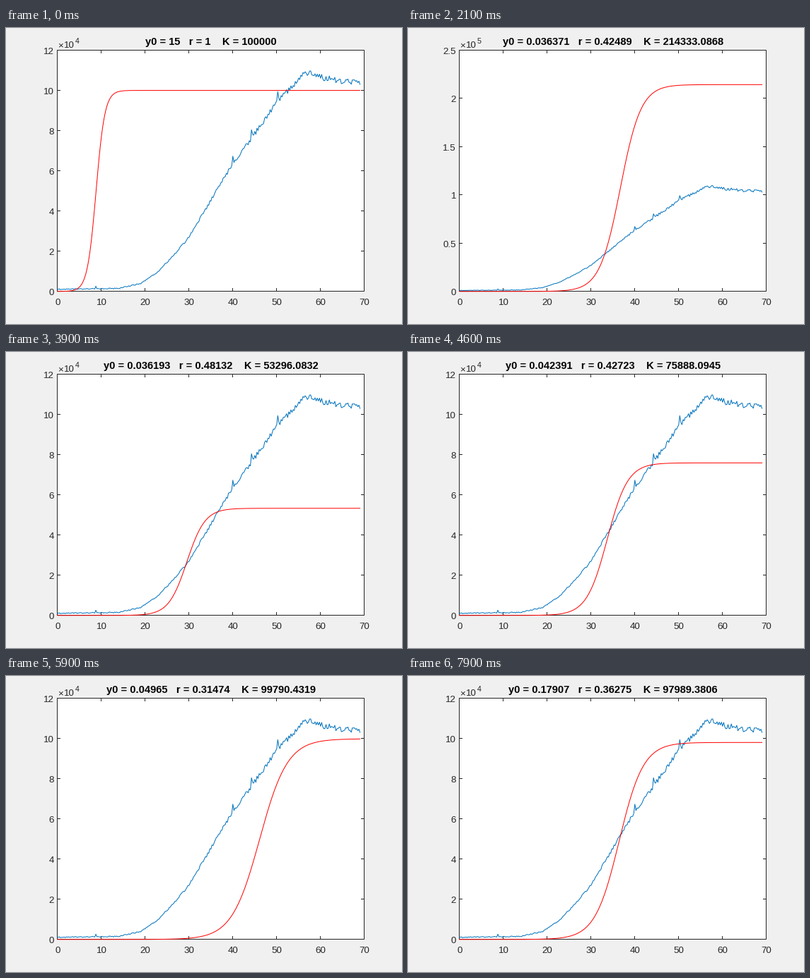
Recreate the animation shown at these times as a matplotlib script. Size 560 by 420 pixels, loop 8 s.

```python
import math
import numpy as np
import matplotlib.pyplot as plt
from matplotlib.animation import FuncAnimation
from matplotlib.collections import LineCollection

W, H, DPI = 560, 420, 100
PX = 72 / DPI
DARK = "#262626"
LEFT, RIGHT, TOP, BOTTOM = 72.5, 506.5, 31.5, 373.5  # frame line centres
TICK = 4.5

plt.rcParams["font.family"] = "Liberation Sans"
fig = plt.figure(figsize=(W / DPI, H / DPI), dpi=DPI, facecolor="#f0f0f0")
ax = fig.add_axes([0, 0, 1, 1])
ax.set_xlim(0, W)
ax.set_ylim(H, 0)
ax.axis("off")


def label(x, y, s="", size=13.33, ha="center", color=DARK, **kw):
    return ax.text(x, y, s, fontsize=size * PX, ha=ha, va="baseline",
                   color=color, **kw)


def lines(segments):
    group = LineCollection(segments, colors=DARK, linewidths=PX, zorder=1)
    group.set_snap(False)
    return ax.add_collection(group)


def to_x(t):
    return W * (.13 + .775 * t / 70)


def to_y(v, top):
    return H * (.89 - .815 * v / top)


# Measured series: a rising trend with growing noise and a few spikes
t = np.linspace(0, 69, 277)
trend = np.interp(t, [0, 14, 19, 23, 26.5, 30, 39, 50, 56, 58, 61, 69],
                  [.1, .15, .4, 1, 1.8, 2.7, 6, 9.4, 10.75, 10.85, 10.6, 10.35])
noise = np.random.default_rng(4).uniform(-1, 1, t.size)
data = trend + noise * (.025 + .012 * trend)
for when, lift in (8.75, .13), (40, .42), (44.25, .42), (50.25, .48):
    i = round(when * 4)
    data[i] = trend[i] + lift
data *= 1e4

# Fit iterations: key states (y0, r, K); the others lie between them
KEYS = {
    0: (15, 1, 100000),
    2: (.074967, .49972, 44126.991),
    3: (.036371, .52014, 53295.9731),
    4: (.036368, .51334, 53295.9425),
    6: (.036193, .48132, 53296.0832),
    8: (.04965, .37921, 108056.7752),
    9: (.11563, .35711, 108056.7736),
    12: (.17907, .36275, 97989.3806),
}
# Rejected trials after an iteration: how many, and relative reach in K
TRIALS = {0: (1, -.47), 2: (1, .3), 3: (8, 3.3), 4: (4, 1.1), 5: (1, 0),
          6: (3, 1.1), 7: (1, .67), 8: (7, -.09), 9: (1, -.02)}


def timeline():
    out = []
    for n in range(max(KEYS) + 1):
        y0, r, k = (math.exp(np.interp(n, list(KEYS), np.log(column)))
                    for column in zip(*KEYS.values()))
        if n == max(KEYS):
            return out + [(y0, r, k)]
        # Hold, then a tiny probe of K, then ever shorter trial steps
        out += [(y0, r, k)] * 3 + [(y0, r, k * (1 + 2 ** -26))]
        count, reach = TRIALS.get(n, (0, 0))
        for j in range(count):
            w = 1 - .6 * (j / 8) ** 2
            out.append((y0, r * (1 - .2 * w), k * (1 + reach * w)))


STATES = timeline()


def num(v):
    digits = max(math.floor(math.log10(v)), 0) + 5
    return f"{v:.{digits}g}"


def scale_for(peak):
    """Axis top, tick step and power of ten."""
    for top, step, power in ((12e4, 2e4, 4), (15e4, 5e4, 4), (2e5, 2e4, 5)):
        if peak <= top:
            return top, step, power
    return 2.5e5, 5e4, 5


# Plot frame and x ticks
ax.fill([LEFT, RIGHT, RIGHT, LEFT], [TOP, TOP, BOTTOM, BOTTOM],
        color="white", lw=0, zorder=0)
fixed = [[(LEFT, TOP), (RIGHT, TOP)], [(LEFT, BOTTOM), (RIGHT, BOTTOM)],
         [(LEFT, TOP), (LEFT, BOTTOM)], [(RIGHT, TOP), (RIGHT, BOTTOM)]]
for n in range(8):
    x = LEFT + (RIGHT - LEFT) * n / 7
    fixed += [[(x, BOTTOM), (x, BOTTOM - TICK)], [(x, TOP), (x, TOP + TICK)]]
    label(x + .5, 393, str(10 * n))
lines(fixed)

y_ticks = lines([])
y_labels = [label(68, 0, ha="right") for _ in range(11)]
label(73, 28, "×", ha="left")
label(82, 28, "10", ha="left")
exponent = label(98, 22, size=10.67, ha="left")
title = label(290, 24, size=14.67, color="black", weight="bold")

blue, = ax.plot([], [], color="#0072bd", lw=PX, zorder=3)
red, = ax.plot([], [], color="#ff0000", lw=PX, zorder=4)


def draw(i):
    y0, r, k = STATES[i]
    curve = k / (1 + (k / y0 - 1) * np.exp(-r * t))
    top, step, power = scale_for(max(curve.max(), data.max()))
    blue.set_data(to_x(t), to_y(data, top))
    red.set_data(to_x(t), to_y(curve, top))

    count = round(top / step)
    segments = []
    for n, text in enumerate(y_labels):
        text.set_visible(n <= count)
        if n <= count:
            y = math.floor(BOTTOM - (BOTTOM - TOP) * n / count) + .5
            segments += [[(LEFT, y), (LEFT + TICK, y)],
                         [(RIGHT, y), (RIGHT - TICK, y)]]
            text.set_text(f"{n * step / 10 ** power:g}")
            text.set_y(y + 5.5)
    y_ticks.set_segments(segments)
    exponent.set_text(str(power))
    title.set_text(f"y0 = {num(y0)}   r = {num(r)}    K = {num(k)}")
    return blue, red, y_ticks, exponent, title, *y_labels


anim = FuncAnimation(fig, draw, frames=len(STATES), interval=100,
                     repeat=True, repeat_delay=0, blit=False)
plt.show()
```
